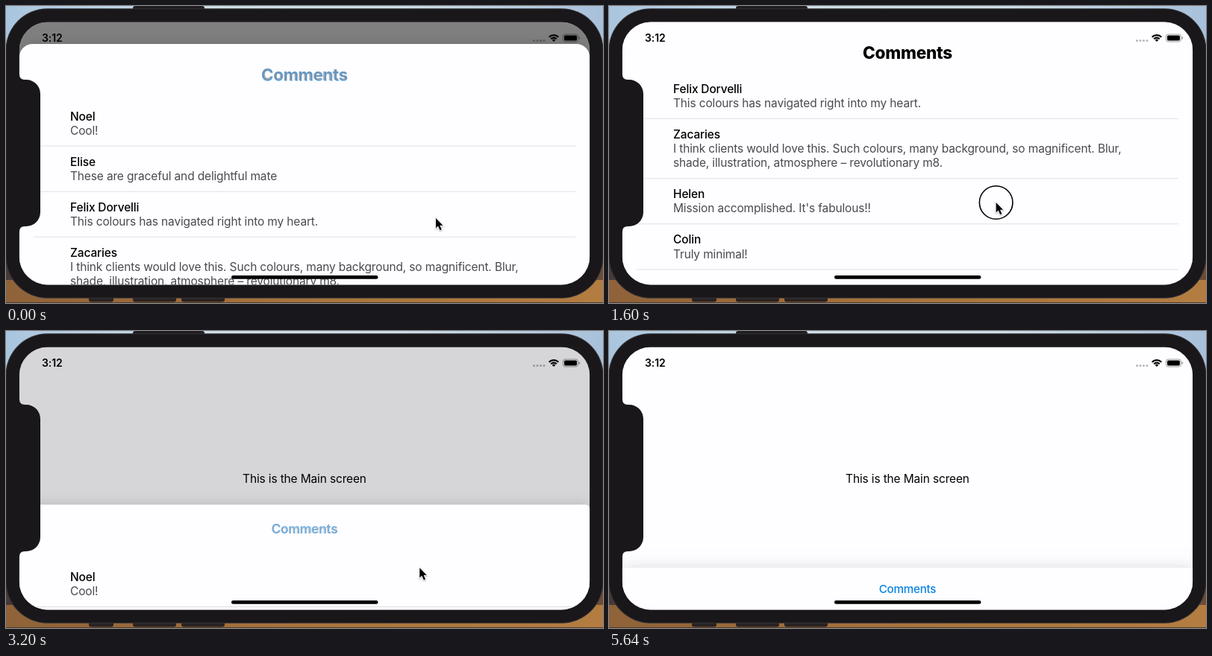
Recreate the animation shown at these times as an HTML page with a canvas. Size 800x399 px, loop 5.68 s.

```html
<!DOCTYPE html>
<html lang="en">
<head>
<meta charset="utf-8">
<title>Comments sheet</title>
<style>
html, body { margin: 0; width: 100%; height: 100%; overflow: hidden; }
canvas { display: block; }
</style>
</head>
<body>
<canvas id="stage" width="800" height="399"></canvas>
<script>
const ctx = document.getElementById('stage').getContext('2d');
const LOOP = 5680, STEP = 40, OPEN = 20, CLOSED = 318;
const SCREEN = [17.75, 21.5, 764.5, 353];
const WHITE = '#fefdff', BODY = '#19171a', BLUE = '#0a84e4';
const FAMILY = 'Inter, "Liberation Sans", sans-serif';

const comments = [
  ['Noel', 'Cool!'],
  ['Elise', 'These are graceful and delightful mate'],
  ['Felix Dorvelli', 'This colours has navigated right into my heart.'],
  ['Zacaries', 'I think clients would love this. Such colours, many background, so magnificent. Blur,',
    'shade, illustration, atmosphere – revolutionary m8.'],
  ['Helen', "Mission accomplished. It's fabulous!!"],
  ['Colin', 'Truly minimal!']
];

const ease = {
  line: u => u,
  out: u => 1 - (1 - u) ** 2,
  both: u => u * u * (3 - 2 * u)
};

// Keys are [time, value, easing towards this key].
function track(keys, t) {
  const i = keys.findIndex(k => k[0] > t);
  if (i < 0) return keys[keys.length - 1][1];
  if (i === 0) return keys[0][1];
  const [t0, v0] = keys[i - 1], [t1, v1, name = 'both'] = keys[i];
  return v0 + (v1 - v0) * ease[name]((t - t0) / (t1 - t0));
}

const sheetTop = [[0, 51], [260, OPEN, 'out'], [2700, OPEN], [3040, 119], [3500, CLOSED, 'out']];
const scrollY = [[560, 0], [860, 62], [1000, 87, 'line'], [1260, 128, 'out'], [1610, 128],
  [1770, 62], [1960, -22, 'out'], [2200, -5], [2340, 0, 'out']];
const cursorX = [[0, 576], [500, 516], [1000, 509], [1540, 518], [1770, 522], [2200, 576],
  [2650, 561], [3040, 555], [3720, 550], [4860, 550], [5360, 640]];
const cursorY = [[0, 285], [180, 285], [540, 262], [860, 172], [1000, 165], [1540, 264], [1610, 264],
  [1770, 330], [2200, 133], [2690, 221], [3040, 321], [3720, 301], [4860, 301], [5360, -25]];
const presses = [[550, 880], [1540, 1780], [2690, 3020]];

function box(x, y, w, h, r, fill) {
  ctx.beginPath();
  ctx.roundRect(x, y, w, h, r);
  ctx.fillStyle = fill;
  ctx.fill();
}

function text(str, x, y, { size = 15.5, weight = 400, color = '#000', align = 'left', gap = -0.15 } = {}) {
  ctx.font = `${weight} ${size}px ${FAMILY}`;
  ctx.letterSpacing = gap + 'px';
  ctx.textAlign = align;
  ctx.fillStyle = color;
  ctx.fillText(str, x, y);
}

function gradient(x, y, x2, y2, ...stops) {
  const g = ctx.createLinearGradient(x, y, x2, y2);
  stops.forEach((c, i) => g.addColorStop(i / (stops.length - 1), c));
  return g;
}

function drawDesk() {
  box(0, 0, 800, 200, 0, gradient(0, 0, 800, 0, '#a9c5de', '#cfdfe8', '#cddde7', '#a8c0da'));
  box(0, 200, 800, 172, 0, gradient(0, 0, 800, 0, '#453a38', '#6b4c36'));
  box(0, 368, 800, 31, 0, gradient(0, 0, 800, 0, '#8f6239', '#a8743c', '#b37d41'));
  box(0, 398, 800, 1, 0, '#4b3a2c');
  box(170, 0, 96, 10, 3, '#1f1d20');
  for (const [x, w] of [[111, 33], [170, 58], [235, 58]]) box(x, 385, w, 12.5, 3, '#2a2322');
}

function drawBody() {
  box(-0.5, 3.3, 801, 389.4, 56, '#353336');
  box(0.5, 4.3, 799, 387.4, 55, BODY);
}

function drawTitle(p, top, opening) {
  const y = 346 - (CLOSED - top) * 0.95;
  const layer = (alpha, scale, style) => {
    if (alpha <= 0) return;
    ctx.save();
    ctx.globalAlpha = alpha;
    ctx.translate(400, y);
    ctx.scale(scale, scale);
    text('Comments', 0, style.size * 0.364, { align: 'center', gap: -0.25, ...style });
    ctx.restore();
  };
  layer(opening ? p ** 10 : p ** 1.4, (76 + 44 * p) / 120, { size: 22.6, weight: 800 });
  layer(opening ? 1 - p ** 6 : (1 - p) ** 2, (76 + 44 * p) / 76, { size: 15.2, weight: 500, color: BLUE });
}

function drawList(top, scroll) {
  ctx.save();
  ctx.beginPath();
  ctx.rect(18, top + 78, 764, 400);
  ctx.clip();
  let y = top + 76 - scroll;
  for (const [name, ...lines] of comments) {
    text(name, 86, y + 26.5, { weight: 500 });
    lines.forEach((line, i) => text(line, 86, y + 45.7 + i * 19.2, { color: '#4a494c' }));
    y += 61.1 + (lines.length - 1) * 19.3;
    box(37, y - 0.5, 726, 1, 0, '#e1e0e2');
  }
  ctx.restore();
}

function drawSheet(t) {
  const top = track(sheetTop, t), p = (CLOSED - top) / (CLOSED - OPEN);
  ctx.fillStyle = `rgba(0,0,0,${0.55 * p})`;
  ctx.fillRect(...SCREEN);
  ctx.save();
  ctx.shadowColor = 'rgba(0,0,0,.14)';
  ctx.shadowBlur = 18;
  box(SCREEN[0], top, SCREEN[2], 420, [20 * p, 20 * p, 0, 0], WHITE);
  ctx.restore();
  if (p > 0) drawList(top, track(scrollY, t));
  drawTitle(p, top, t < 1000);
}

function drawStatus() {
  text('3:12', 48, 48.4, { size: 14, weight: 600, gap: -0.1 });
  for (let i = 0; i < 4; i++) box(706 + i * 4.5, 45, 3, 3, 1.5, 'rgba(0,0,0,.28)');
  ctx.strokeStyle = '#000';
  ctx.lineWidth = 2.2;
  for (const r of [8.9, 5.4]) {
    ctx.beginPath();
    ctx.arc(734, 48, r, -Math.PI * 0.75, -Math.PI * 0.25);
    ctx.stroke();
  }
  ctx.beginPath();
  ctx.moveTo(734, 48);
  ctx.arc(734, 48, 3.2, -Math.PI * 0.75, -Math.PI * 0.25);
  ctx.fillStyle = '#000';
  ctx.fill();
  ctx.strokeStyle = 'rgba(0,0,0,.38)';
  ctx.lineWidth = 1;
  ctx.beginPath();
  ctx.roundRect(746.5, 38, 20, 10, 3);
  ctx.stroke();
  box(748, 39.5, 17, 7, 1.7, '#000');
  box(767.7, 41.3, 1.4, 3.5, 0.7, 'rgba(0,0,0,.4)');
}

function drawNotch() {
  ctx.fillStyle = BODY;
  ctx.fill(new Path2D('M17 92H18Q18 99 25 99H27A19 19 0 0 1 46 118V277A19 19 0 0 1 27 296H25Q18 296 18 303H17Z'));
}

function drawCursor(t) {
  ctx.save();
  ctx.translate(track(cursorX, t), track(cursorY, t));
  if (presses.some(([from, to]) => t >= from && t < to)) {
    ctx.beginPath();
    ctx.arc(0, 0, 22.3, 0, 7);
    ctx.strokeStyle = '#000';
    ctx.lineWidth = 1.6;
    ctx.stroke();
  }
  const arrow = new Path2D('M0 0V13.4L3 10.5 5.5 16.2 7.8 15.2 5.4 9.7H9.5Z');
  ctx.shadowColor = 'rgba(0,0,0,.3)';
  ctx.shadowBlur = 2;
  ctx.shadowOffsetY = 1;
  ctx.strokeStyle = '#fff';
  ctx.lineWidth = 1.8;
  ctx.stroke(arrow);
  ctx.shadowColor = 'transparent';
  ctx.fillStyle = '#000';
  ctx.fill(arrow);
  ctx.restore();
}

function draw() {
  const t = Math.floor(performance.now() % LOOP / STEP) * STEP;
  drawDesk();
  drawBody();
  ctx.save();
  ctx.beginPath();
  ctx.roundRect(...SCREEN, 38);
  ctx.clip();
  ctx.fillStyle = WHITE;
  ctx.fillRect(...SCREEN);
  text('This is the Main screen', 400, 203.8, { align: 'center' });
  drawSheet(t);
  drawStatus();
  box(302, 362, 196.5, 4.8, 2.4, '#000');
  ctx.restore();
  drawNotch();
  drawCursor(t);
  requestAnimationFrame(draw);
}
draw();
</script>
</body>
</html>
```
